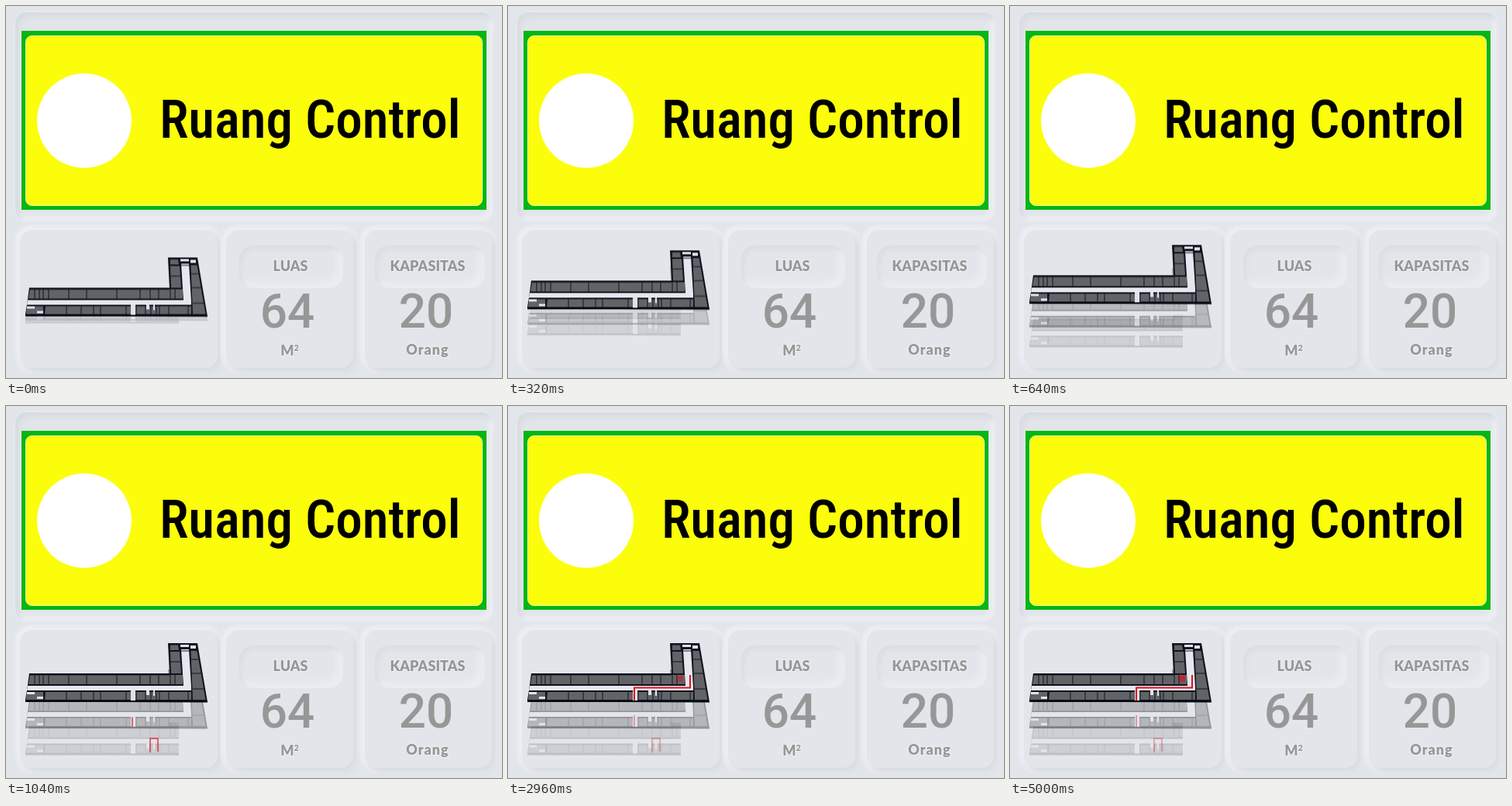
Animation of 640 by 480 pixels, one loop 5120 ms. Source, as an HTML page:

```html
<!DOCTYPE html>
<html lang="id">
<head>
<meta charset="utf-8">
<title>Ruang Control</title>
<style>
  html, body { margin: 0; width: 100%; height: 100%; overflow: hidden; background: #e2e5ea; }
  .stage { position: relative; width: 640px; height: 480px; overflow: hidden; }
  .stage > * { position: absolute; }
  .board { left: 12px; top: 8px; width: 616px; height: 269px; border-radius: 14px;
    box-shadow: inset 5px 7px 6px #d9dce1, inset -6px -6px 5px #ebedf1, 0 0 4px #eceef2; }
  .card { top: 289px; width: 164px; height: 178px; border-radius: 16px; background: #e2e5ea;
    box-shadow: -5px -5px 5px #eceef2, 5px 5px 5px #dadde2, 0 0 0 7px #e7e9ee; }
  .map { left: 18px; width: 255px; }
  .area { left: 284px; }
  .seats { left: 463px; }
  .pill { left: 17px; top: 20px; width: 134px; height: 55px; border-radius: 18px; position: absolute;
    box-shadow: inset 4px 5px 5px #dbdee3, inset -9px -9px 7px #eaecf0; }
  .wide { left: 13px; width: 142px; }
  svg { left: 0; top: 0; display: block; }

  .title { font: 500 69px "Roboto Condensed", Roboto, sans-serif; font-stretch: 75%; }
  .label { font: 900 18px Lato, sans-serif; }
  .count { font: 500 62px Roboto, sans-serif; }
  .label, .count { fill: #979797; text-anchor: middle; }
  .label { stroke: #f0f1f4; stroke-width: 2px; paint-order: stroke; }

  .route { fill: none; stroke: #e3101c; stroke-width: 2; stroke-dasharray: 1 1; }
  .floor, .route, .pin { animation: 5.12s linear infinite both; }
  .top { animation-name: top; }
  .mid { animation-name: mid; }
  .low { animation-name: low; }
  .r1 { animation-name: lowRoute; }
  .r2 { animation-name: midRoute; }
  .r3 { animation-name: topRoute; }
  .pin { animation-name: pin; }

  /* The floors spread apart in the first second. */
  @keyframes top {
    0% { transform: translateY(18.5px); animation-timing-function: cubic-bezier(.39, .575, .565, 1); }
    19.5%, 100% { transform: none; }
  }
  @keyframes mid {
    0% { transform: translateY(24px); opacity: .12; animation-timing-function: cubic-bezier(.39, .575, .565, 1); }
    19.5%, 100% { transform: translateY(34px); opacity: .36; }
  }
  @keyframes low {
    0% { transform: translateY(27.5px); opacity: .12; }
    16.6%, 100% { transform: translateY(68.5px); opacity: .17; }
  }
  /* The route climbs from the lowest floor to the top one. */
  @keyframes lowRoute {
    0%, 13% { stroke-dashoffset: 1; opacity: 0; }
    13.1% { stroke-dashoffset: 1; opacity: .65; }
    19.5% { stroke-dashoffset: 0; opacity: .65; }
    25%, 100% { stroke-dashoffset: 0; opacity: .3; }
  }
  @keyframes midRoute {
    0%, 17% { stroke-dashoffset: 1; opacity: 0; }
    17.1% { stroke-dashoffset: 1; opacity: .6; }
    21% { stroke-dashoffset: 0; opacity: .6; }
    27%, 100% { stroke-dashoffset: 0; opacity: .35; }
  }
  @keyframes topRoute {
    0%, 21% { stroke-dashoffset: 1; opacity: 0; }
    21.1% { stroke-dashoffset: 1; opacity: 1; }
    40%, 100% { stroke-dashoffset: 0; opacity: 1; }
  }
  @keyframes pin {
    0%, 54% { opacity: 0; }
    60%, 100% { opacity: 1; }
  }
</style>
</head>
<body>
<div class="stage">
  <div class="board"></div>
  <div class="card map"></div>
  <div class="card area"><div class="pill"></div></div>
  <div class="card seats"><div class="pill wide"></div></div>

  <svg width="640" height="480" viewBox="0 0 640 480">
    <defs>
      <clipPath id="short"><path d="M20 340H223V386H20z"/></clipPath>
      <g id="plan">
        <path fill="#10131f" d="M30 345H211L209 306H247L260 382H25V379L27 367z"/>
        <path fill="#e4e8ee" d="M28 361H229L226 314H236L239 362V367H27z"/>
        <g fill="#626366">
          <path d="M31 347.500H211V347H228V359H29z"/>
          <path d="M212 317H224L226 345H213z"/>
          <path d="M212 308.500H222L223 315H212z"/>
          <path d="M238.500 316H246.500L257.500 379H241z"/>
          <path d="M51 369H239V379H50z"/>
          <path d="M27 369H48V379H26z"/>
        </g>
        <path fill="#dfe3e9" d="M27 369H37V372H27zM40 375H48V378H40zM161 367H167V380H161zM181 367H185V373H181zM190 367H192V374H190zM225 308H236V311H225zM238 309H245V313H238z"/>
        <g fill="none" stroke="#10131f">
          <path d="M37 346V359M43 346V359M48 346V359M55 346V359M81 346V359M104 346V359M143 346V359M173 346V359M186 346V359M197 346V359M212 346V359M218 346V359"/>
          <path d="M78 368V380M97 368V380M113 368V380M122 368V380M155 368V380M168 368V380M180 368V380M187 368V380M194 368V380M198 368V380M210 368V380M235 368V380"/>
          <path d="M212 330H226M239 327H249M240 345H252M241 365H256M226 316H238"/>
        </g>
        <path fill="none" stroke="#060914" stroke-width="1.800" d="M25 380.500L260 381.500"/>
      </g>
    </defs>

    <path fill="#04b612" d="M20 32H620V263H20z"/>
    <rect x="25.500" y="38.500" width="589" height="219" rx="8" fill="#fbfd0a" stroke="#f2f7c0"/>
    <circle cx="101" cy="148" r="61" fill="#fff"/>
    <text class="title" x="198" y="170">Ruang Control</text>

    <g class="floor low"><use href="#plan" clip-path="url(#short)"/></g>
    <g class="floor mid"><use href="#plan"/></g>
    <path class="route r1" pathLength="1" d="M186 447V429H196V446"/>
    <path class="route r2" pathLength="1" d="M163 414V399"/>
    <g class="floor top"><use href="#plan"/></g>
    <path class="route r3" pathLength="1" d="M163 380V363.500H235V347"/>
    <g class="pin" fill="none" stroke="#e3101c" stroke-width="1.500">
      <path d="M219.500 346V354.500H225V349H222"/>
      <circle cx="222" cy="351" r="1.500"/>
    </g>

    <text class="label" x="367" y="342">LUAS</text>
    <text class="label" x="544" y="342">KAPASITAS</text>
    <text class="count" x="363" y="415">64</text>
    <text class="count" x="542" y="415">20</text>
    <text class="label" x="366" y="451">M<tspan font-size="11" dy="-6">2</tspan></text>
    <text class="label" x="544" y="450" letter-spacing="1">Orang</text>
  </svg>
</div>
<script>
  // Without a condensed face the title takes a smaller size.
  const title = document.querySelector(".title");
  if (title.getComputedTextLength() > 410) title.style.fontSize = "58px";
</script>
</body>
</html>
```
